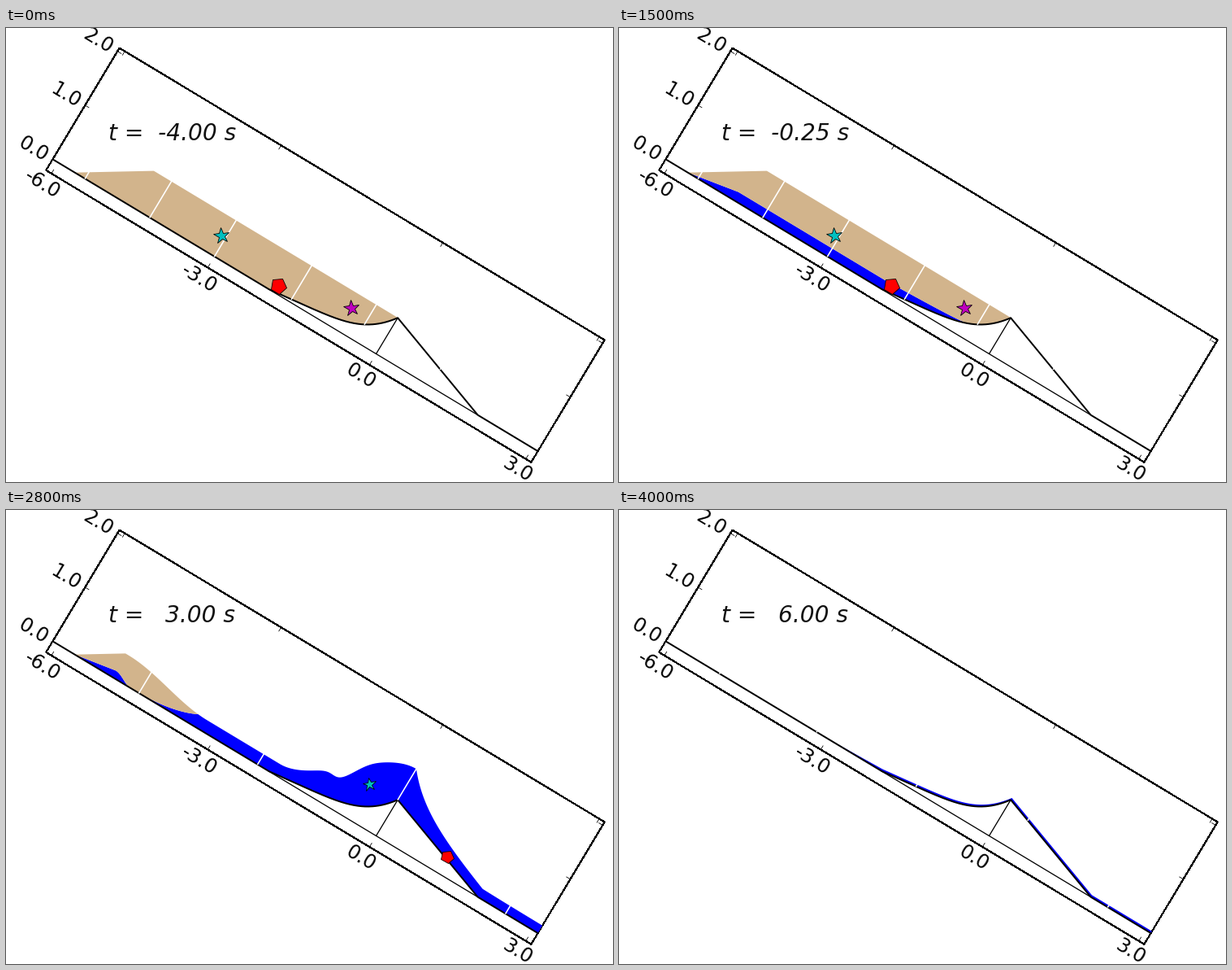
A matplotlib script for the animation above (4.1 s loop, 747 by 558 pixels).

```python
import numpy as np
import matplotlib.pyplot as plt
from matplotlib.animation import FuncAnimation
from matplotlib.markers import MarkerStyle
from matplotlib.patches import Polygon
from matplotlib.transforms import Affine2D

W, H = 747, 558
FRAMES, STEP = 41, 100
TILT = 31
UNIT = 77.4                  # pixels per unit
X0, Y0 = 455, 400            # origin of the slope axes on the stage
LIP, FOOT = 0.667, 1.885     # dam height, end of its ramp
TOE = -5.59                  # upper end of the material
LO, HI = -0.205, 2.06        # height range of the box


def smooth(u):
    u = np.clip(u, 0, 1)
    return u * u * (3 - 2 * u)


def track(t, times, values):
    """Monotone cubic through key values, at rest at both ends."""
    d = np.diff(values) / np.diff(times)
    a, b = d[:-1], d[1:]
    same = a * b > 0
    m = np.zeros(len(times))
    m[1:-1] = np.where(same, 2 * a * b / np.where(same, a + b, 1), 0)
    i = int(np.clip(np.searchsorted(times, t) - 1, 0, len(times) - 2))
    h = times[i + 1] - times[i]
    u = np.clip((t - times[i]) / h, 0, 1)
    bend = u * (1 - u) * h * (m[i] * (1 - u) - m[i + 1] * u)
    return values[i] + (values[i + 1] - values[i]) * smooth(u) + bend


s = np.linspace(-6, 3, 901)
bowl = np.clip(s + 2, 0, 2)
bed = np.where(s <= 0, 0.12 * bowl + 0.427 * (bowl / 2) ** 6,
               np.clip(LIP * (1 - s / FOOT), 0, None))

# Shape of the flow at rest, overtopping, surge, draining, trickle, end
STAGES = [0, 1.75, 3, 4, 5, 6]
SHAPE = {
    "level": [0.67, 0.51, 0.19, 0.09, 0.045, 0],     # sheet on the slope
    "rise": [0, 0.54, 1.05, 0.93, 0.73, 0.70],       # heap behind the lip
    "heap": [-3, -3, -1.9, -0.38, -0.25, -0.1],      # where it begins
    "width": [3.9, 3.9, 1.9, 0.18, 0.15, 0.1],
    "dip": [0, 0, 0.2, 0, 0, 0],                     # trough before it
    "pile": [0, 0.02, 0.24, 0.215, 0.11, 0],         # remnant up the slope
    "start": [-4.6, -4.7, -4.85, -5.2, -5.5, -5.7],
    "film": [0, 0.05, 0.1, 0.08, 0.05, 0.035],
    "ramp": [0.03, 0.045, 0.14, 0.155, 0.08, 0.035],
    "decay": [2.5, 2.5, 2, 3, 3, 3],
    "tip": [0.07, 0.07, -3.42, -4.23, -4.9, -5.58],  # end of solid material
    "share": [0.62, 0.62, 1, 1, 1, 1],
    "power": [0.7, 0.7, 4.5, 5, 5, 5],
}


def surface(t, p):
    """Free surface and the place of its crest."""
    body = (p["level"] + p["rise"] * smooth((s - p["heap"]) / p["width"])
            + p["pile"] * (1 - smooth((s - p["start"]) / 1.6))
            - p["dip"] * np.exp(-((s + 0.95) / 0.2) ** 2))
    body = np.maximum(body, bed + p["film"] * np.clip(s + 3, 0, 1))
    cap = 0.63 * (s - TOE)
    crest = s[np.argmax(cap >= body)]
    body = np.minimum(body, cap)

    # Down the ramp the layer thins out and ends at an advancing front
    lip = np.interp(0, s, body - bed)
    sheet = p["ramp"] + (lip - p["ramp"]) * np.exp(-p["decay"] * s.clip(0))
    front = 0.72 * max(t, 0) ** 2
    sheet *= np.clip((front - s) / 0.15, 0, 1)
    return np.where(s > 0, bed + sheet, np.maximum(body, bed)), crest


def layers(t):
    """Top of the fluid and top of everything at time t."""
    p = {name: track(t, STAGES, keys) for name, keys in SHAPE.items()}
    top, crest = surface(t, p)

    # Before release the fluid creeps up evenly from the bed
    depth = 0.0263 * (min(t, 0) + 4) ** 1.316
    still = depth * np.clip((s - TOE) / 0.85, 0, 1) + 0.35 * bed

    # Afterwards: a wedge behind the crest, a scoop rising to the tip
    wedge = 0.17 * (np.minimum(s, crest) - TOE)
    wedge = wedge * (1 - smooth((s - crest) / 0.35))
    u = np.clip((s - crest) / max(p["tip"] - crest, 0.05), 0, 1)
    scoop = bed + (top - bed) * p["share"] * u ** p["power"]
    moving = np.maximum(wedge, scoop)

    mix = smooth(t / 1.75)
    wet = np.clip(still + (moving - still) * mix, bed, top)
    return np.where(s > p["tip"], top, wet), top


def seams(t):
    """Joints between the plotted blocks."""
    if t < 2.5:
        return [-5.4, -4.2, -3, -1.6, -0.4, 1]
    if t < 3.5:
        return [-4.4, -2.2, 0, 2.4]
    return np.arange(-5, 3, 1.8)


# Stage: data units are pixels, y down
fig = plt.figure(figsize=(W / 72, H / 72), dpi=72, facecolor="white")
ax = fig.add_axes([0, 0, 1, 1])
ax.set_xlim(-0.5, W - 0.5)
ax.set_ylim(H - 0.5, -0.5)
ax.axis("off")
C, S = UNIT * np.cos(np.radians(TILT)), UNIT * np.sin(np.radians(TILT))
slope = Affine2D.from_values(C, S, S, -C, X0, Y0)
on_slope = slope + ax.transData


def line(xs, ys, lw=1.0, z=1, color="black", aa=True):
    return ax.plot(xs, ys, color=color, lw=lw, zorder=z, transform=on_slope,
                   solid_capstyle="butt", antialiased=aa)[0]


def label(value, x, y):
    px, py = slope.transform((x, y))
    ax.text(px - 3, py + 0.5, f"{value:.1f}".replace("\u2212", "-"), size=24,
            rotation=-TILT, ha="center", va="center", family="DejaVu Sans")


line([-6, 3, 3, -6, -6], [LO, LO, HI, HI, LO], aa=False)
for x in (-6, -3, 0, 3):
    at = np.clip(x, -5.9, 2.9)
    for edge, tick in ((LO, 0.075), (HI, -0.075)):
        line([at, at], [edge, edge + tick], 0.8)
    label(x, at, -0.4)
for y in (0, 1, 2):
    for edge, tick in ((-6, 0.075), (3, -0.075)):
        line([edge, edge + tick], [y, y], 0.8)
    label(y, -6.32, y)
line([-2, FOOT], [0, 0], 1.3)
line([0, 0], [0, LIP], 1.3)
line(s, bed, 2, 4)

clock = ax.text(125, 138, "", size=28, style="italic", va="baseline",
                family="DejaVu Sans", color="#111111")
fluid = Polygon([(0, 0)], fc="#0000ff", lw=0, zorder=2, transform=on_slope)
solid = Polygon([(0, 0)], fc="tan", lw=0, zorder=3, transform=on_slope)
ax.add_patch(fluid)
ax.add_patch(solid)
gaps = line([], [], 1.6, 5, "white")


class Tracer:
    """A marker carried by the flow at a fixed share of its depth."""

    def __init__(self, shape, turn, color, start, depth):
        self.start, self.depth = start, depth
        marker = MarkerStyle(shape).rotated(deg=turn)
        self.dot = line([], [], z=6)
        self.dot.set(linestyle="", marker=marker, mfc=color, mec="black",
                     mew=0.8)

    def show(self, t, top):
        run = max(t, 0)
        x = self.start + 0.147 * run ** 2.6
        if x > 0:
            x *= 1.7         # faster down the ramp
        y = np.interp(x, s, bed + self.depth * (top - bed))
        self.dot.set_data([x], [y])
        self.dot.set_markersize(20 - run)
        self.dot.set_visible(bool(x < 3))


tracers = [Tracer("*", 8, "#00bfbf", -3.08, 0.5),
           Tracer("p", -TILT, "#ff0000", -1.89, 0.16),
           Tracer("*", 8, "#bf00bf", -0.72, 0.5)]


def band(low, high):
    return np.r_[np.c_[s, low], np.c_[s, high][::-1]]


def draw(i):
    t = -4 + 0.25 * i
    wet, top = layers(t)
    fluid.set_xy(band(bed, wet))
    solid.set_xy(band(wet, top))
    gx, gy = [], []
    for x in seams(t):
        gx += [x, x, np.nan]
        gy += [np.interp(x, s, bed) - 0.005, np.interp(x, s, top) + 0.015,
               np.nan]
    gaps.set_data(gx, gy)
    for tracer in tracers:
        tracer.show(t, top)
    clock.set_text(f"t = {t:6.2f} s")
    return [fluid, solid, gaps, clock] + [tr.dot for tr in tracers]


anim = FuncAnimation(fig, draw, frames=FRAMES, interval=STEP,
                     init_func=lambda: draw(0), repeat=True, repeat_delay=0)
plt.show()
```
